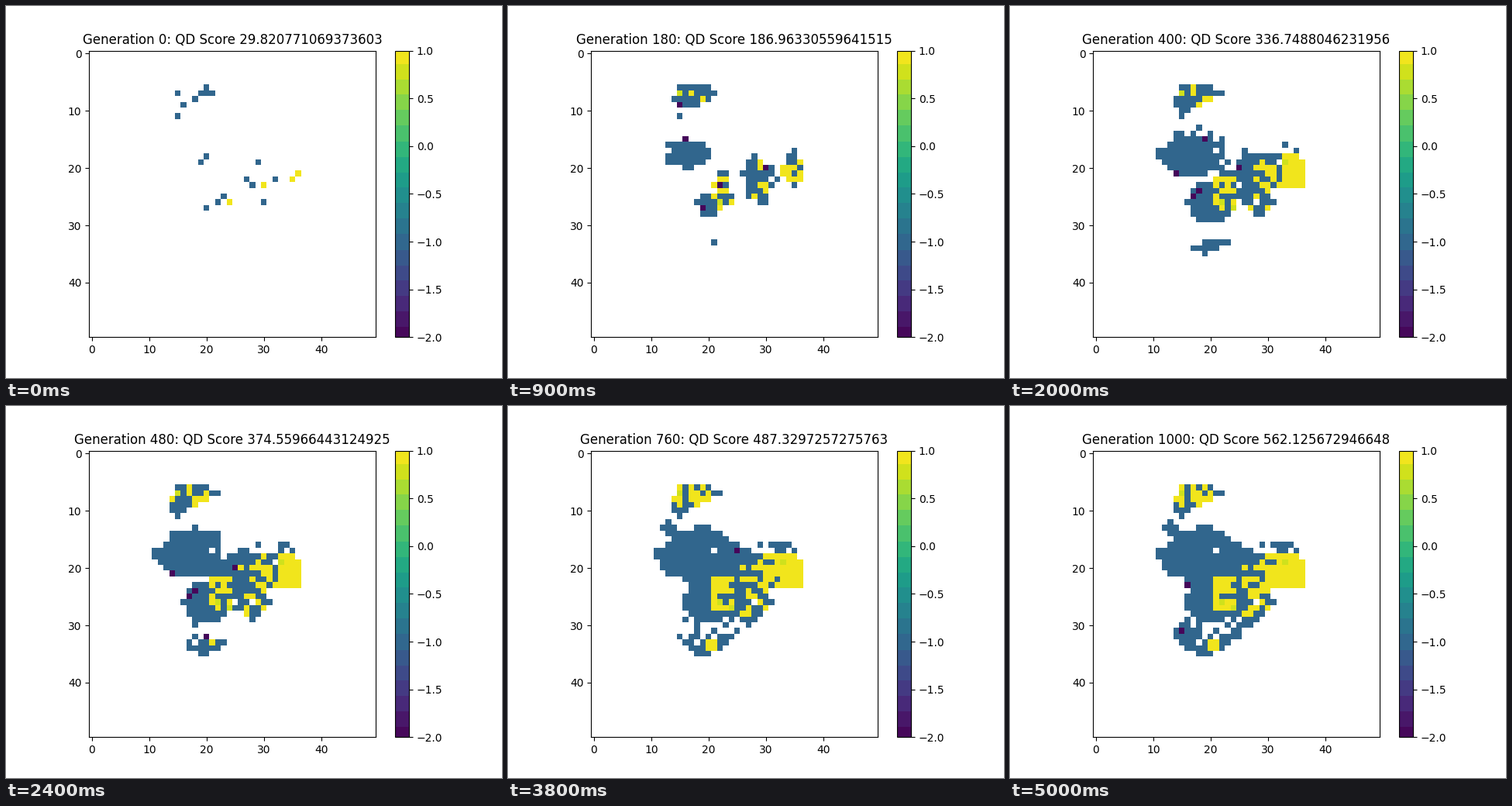
Animation, 640 px wide and 480 px high, one loop 5100 ms. Source, as a matplotlib script:

```python
import numpy as np
import matplotlib.pyplot as plt
from matplotlib.animation import FuncAnimation
from matplotlib.colors import ListedColormap

SIZE = 50
FRAMES = 51
DARK, BLUE, GREEN, LIME, YELLOW = -2, -1, 0.4, 0.75, 1

rng = np.random.default_rng(11)
rows, cols = np.mgrid[:SIZE, :SIZE]

# Cells alive from the beginning, as (column, row).
FIRST_BLUE = [(20, 6), (15, 7), (19, 7), (20, 7), (21, 7), (18, 8), (16, 9),
              (15, 11), (20, 18), (19, 19), (29, 19), (27, 22), (32, 22),
              (28, 23), (23, 25), (22, 26), (30, 26), (20, 27)]
FIRST_GOLD = [(36, 21), (35, 22), (30, 23), (24, 26)]

# Key points of the final silhouette: row, left column, right column.
OUTLINE = [(6, 15, 20), (7, 15, 22), (9, 14, 18), (11, 15, 15), (12, 13, 13),
           (13, 12, 20), (15, 14, 23), (16, 13, 34), (17, 11, 35),
           (18, 11, 35), (19, 12, 36), (21, 13, 36), (22, 16, 36),
           (23, 16, 36), (24, 17, 30), (26, 16, 31), (28, 17, 29),
           (30, 15, 27), (32, 14, 25), (35, 18, 20)]

# Growth centres: x, y, x radius, y radius, delay in frames.
CENTRES = [(17.5, 7, 3.5, 2.5, 0), (16.5, 17.5, 4, 2.5, 0),
           (20, 26.5, 2.2, 2.5, 0), (22.5, 24, 1.5, 3, 0),
           (28.5, 22, 2.6, 4, 0), (35, 20.5, 2, 3, 0),
           (20, 33.5, 2.5, 1.5, 9)]

# Areas that turn yellow: x, y, x radius, y radius, begin, end, share.
GOLD = [(34.5, 20.5, 2.4, 3, 0, 12, 0.96), (30.5, 20.5, 2.5, 2.9, 5, 45, 0.85),
        (22.5, 24.5, 2.3, 2.9, 0, 45, 0.85), (28, 24, 2.6, 4.5, 0, 60, 0.7),
        (17, 7.5, 3.2, 2, 5, 38, 0.6), (20.5, 33.5, 0.9, 0.9, 18, 40, 1)]

KEY_FRAMES = [0, 9, 16, 24, 30, 38, 50]
SCORES = [29.820771069373603, 186.96330559641515, 298.93794481514203,
          374.55966443124925, 428.7010603584668, 487.3297257275763,
          562.125672946648]


def noise(low=0, high=1):
    return rng.uniform(low, high, (SIZE, SIZE))


def reach(x, y, rx, ry, power=2):
    """Distance from a centre in radii; higher powers are squarer."""
    dx, dy = np.abs(cols - x) / rx, np.abs(rows - y) / ry
    return (dx ** power + dy ** power) ** (1 / power)


def silhouette():
    ys, left, right = zip(*OUTLINE)
    inside = (rows >= ys[0]) & (rows <= ys[-1])
    inside &= cols >= np.floor(np.interp(rows, ys, left))
    inside &= cols <= np.round(np.interp(rows, ys, right))
    fill = np.full((SIZE, SIZE), 0.98)
    fill[13:15] = 0.75
    fill[29:34] = 0.7
    fill[15:18, 26:] = 0.5
    return inside & (noise() < fill)


def birth_frames():
    """Growth runs outwards from each centre with a ragged front."""
    waves = [delay + 9 * reach(*shape) ** 1.7 for *shape, delay in CENTRES]
    born = np.min(waves, axis=0) * noise(0.7, 1.4)
    born = np.maximum(np.minimum(born, noise(38, 50)), 1)
    born[~silhouette()] = np.inf
    return born


def gold_frames():
    turn = np.full((SIZE, SIZE), np.inf)
    for *shape, begin, end, share in GOLD:
        chosen = (reach(*shape, power=4) <= 1) & (noise() < share)
        turn[chosen] = np.minimum(turn, noise(begin, end))[chosen]
    return turn


def banded_viridis():
    edges = np.concatenate([[0], np.linspace(0.0333, 0.955, 18), [1]])
    mids = (edges[:-1] + edges[1:]) / 2
    band = np.digitize(np.linspace(0, 0.999, 256), edges) - 1
    return ListedColormap(plt.get_cmap("viridis")(mids[band]))


born = birth_frames()
turn = gold_frames()
shade = rng.choice([YELLOW, LIME, GREEN], (SIZE, SIZE), p=[0.93, 0.05, 0.02])
weak = noise() < 0.05
for x, y in FIRST_BLUE + FIRST_GOLD:
    born[y, x] = 0
    weak[y, x] = False
for x, y in FIRST_GOLD:
    turn[y, x] = 0
    shade[y, x] = YELLOW


def grid_at(i):
    grid = np.where(i >= turn, shade, BLUE)
    grid[weak & (i < born + 8)] = DARK
    return np.where(i >= born, grid, np.nan)


fig, ax = plt.subplots(figsize=(6.4, 4.8), dpi=100)
image = ax.imshow(grid_at(0), cmap=banded_viridis(), vmin=-2, vmax=1)
fig.colorbar(image, ax=ax)
title = ax.set_title("")


def draw(i):
    score = float(np.interp(i, KEY_FRAMES, SCORES))
    image.set_data(grid_at(i))
    title.set_text(f"Generation {20 * i}: QD Score {score}")
    return image, title


anim = FuncAnimation(fig, draw, frames=FRAMES, interval=100, repeat=True,
                     repeat_delay=0, blit=False)
plt.show()
```
